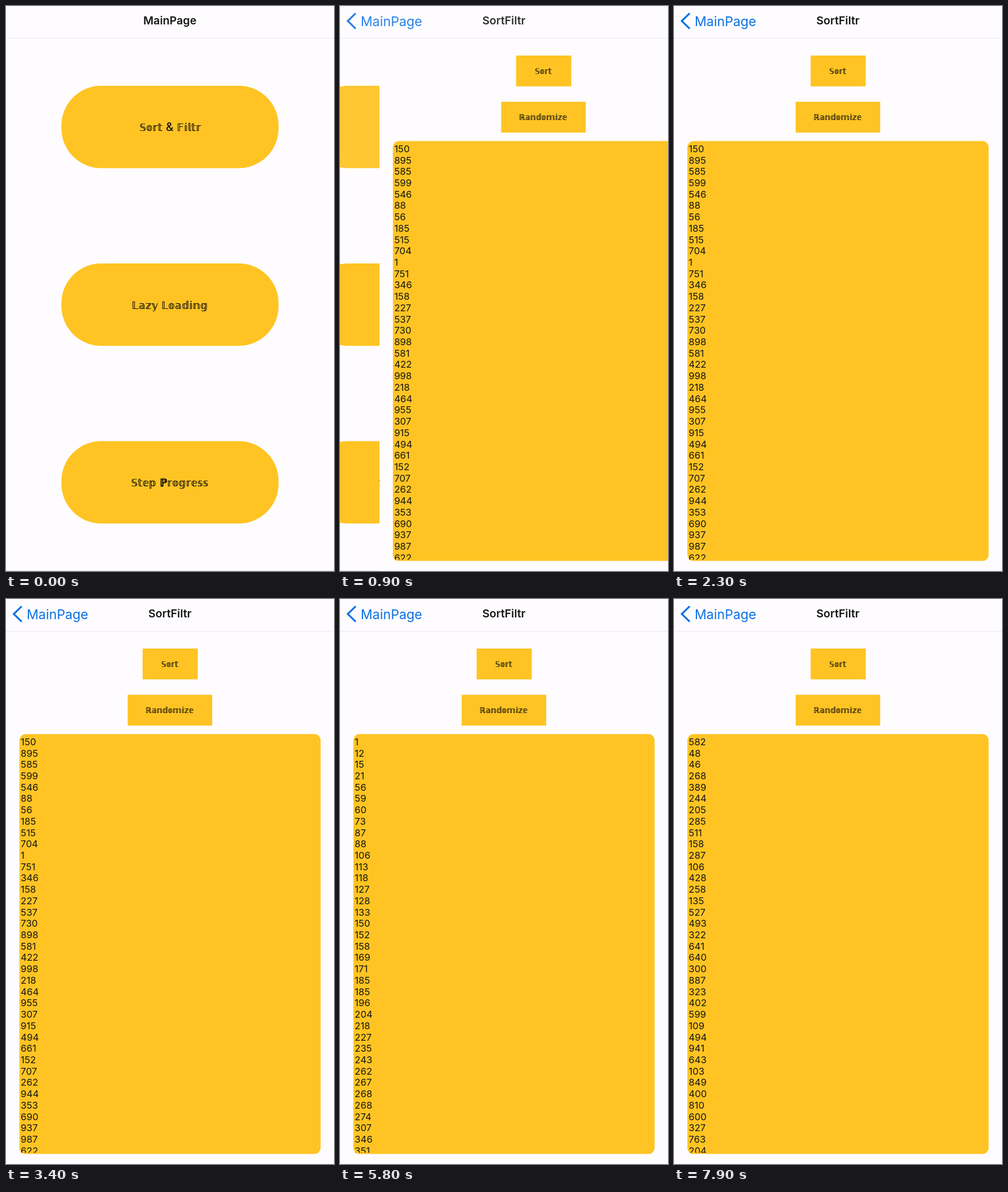
Animation of 571x981 px, one loop 8 s. Source, as an HTML page:

```html
<!DOCTYPE html>
<html lang="en">
<head>
<meta charset="utf-8">
<title>Sort and filter demo</title>
<style>
  html, body { margin: 0; width: 100%; height: 100%; overflow: hidden; background: #fefcff; }
  svg { display: block; width: 100%; height: 100%; }
  text { font-family: Inter, "Liberation Sans", sans-serif; fill: #151515; }
  .title { font-size: 19.3px; font-weight: 600; text-anchor: middle; }
  .back { font-size: 22.8px; fill: #0b72e3; }
  .rows { font-size: 16.5px; }
  .struck { font-family: "DejaVu Sans", sans-serif; text-anchor: middle; fill: #0c0c0c; stroke: #0c0c0c; stroke-width: .15px; }
  .big { font-size: 18.2px; }
  .small { font-size: 13.5px; }
  .plain { font-family: Inter, sans-serif; font-size: 20.5px; }
  .heavy { stroke-width: .9px; }
  .fill { fill: #ffc423; }
  .page { fill: #fefcff; }
  .line { fill: #e9e7eb; }
</style>
</head>
<body>
<svg viewBox="0 0 571 981" preserveAspectRatio="none">
  <defs>
    <clipPath id="rowClip"><rect x="24" y="235" width="523" height="726.5"/></clipPath>
  </defs>
  <rect class="page" width="571" height="981"/>

  <g id="home">
    <g id="sortFiltr">
      <rect class="fill" x="96.5" y="138.5" width="378" height="143" rx="69"/>
      <text class="struck big" x="286" y="217">𝕊𝕠𝕣𝕥 <tspan class="plain">&amp;</tspan> 𝔽𝕚𝕝𝕥𝕣</text>
    </g>
    <rect class="fill" x="96.5" y="447" width="378" height="143" rx="69"/>
    <text class="struck big" x="285" y="525.5">𝕃𝕒𝕫𝕪 𝕃𝕠𝕒𝕕𝕚𝕟𝕘</text>
    <rect class="fill" x="96.5" y="755.5" width="378" height="143" rx="69"/>
    <text class="struck big" x="285" y="834">𝕊𝕥𝕖𝕡 <tspan class="heavy">ℙ</tspan>𝕣𝕠𝕘𝕣𝕖𝕤𝕤</text>
    <rect class="line" y="980" width="571" height="1"/>
  </g>

  <g id="detail">
    <rect class="page" y="57" width="571" height="924"/>
    <g id="sort">
      <rect class="fill" x="237.8" y="86" width="96" height="53.5"/>
      <text class="struck small" x="285.2" y="117.8">𝕊𝕠𝕣𝕥</text>
    </g>
    <g id="randomize">
      <rect class="fill" x="211.8" y="166.3" width="147.2" height="53.5"/>
      <text class="struck small" x="284.6" y="197.8">ℝ𝕒𝕟𝕕𝕠𝕞𝕚𝕫𝕖</text>
    </g>
    <rect class="fill" x="23.3" y="234.6" width="524.4" height="729" rx="11"/>
    <g id="rows" class="rows" clip-path="url(#rowClip)"></g>
  </g>

  <rect class="page" width="571" height="56"/>
  <rect class="line" y="55.5" width="571" height="1"/>
  <text id="homeTitle" class="title" x="285.3" y="32">MainPage</text>
  <g id="detailBar">
    <path d="M27.3 12.7L13.5 26L27.3 39.3" fill="none" stroke="#0b72e3" stroke-width="3.2"/>
    <text class="back" x="36" y="34.6">MainPage</text>
    <text class="title" x="285.3" y="32">SortFiltr</text>
  </g>
</svg>
<script>
const LOOP = 8000, STEP = 100, WIDTH = 571;
const PUSH = 700, SORT = 4400, SHUFFLE = 7000;
const FADE = 280;
const el = id => document.getElementById(id);
const parse = s => s.split(' ').map(Number);

const initial = parse('150 895 585 599 546 88 56 185 515 704 1 751 346 158 227 537 730 898 581 422 998 218 464 955 307 915 494 661 152 707 262 944 353 690 937 987 622');
const below = parse('12 15 21 59 60 73 87 106 113 118 127 128 133 169 171 185 196 204 235 243 267 268 268 274 351');
const sorted = [...initial, ...below].sort((a, b) => a - b).slice(0, initial.length);
const shuffled = parse('582 48 46 268 389 244 205 285 511 158 287 106 428 258 135 527 493 322 641 640 300 887 323 402 599 109 494 941 643 103 849 400 810 600 327 763 204');

const cells = initial.map((_, i) => {
  const cell = document.createElementNS('http://www.w3.org/2000/svg', 'text');
  cell.setAttribute('x', 25.6);
  cell.setAttribute('y', 253.8 + i * 19.72);
  return el('rows').appendChild(cell);
});

let shown;
function showRows(values) {
  if (values === shown) return;
  shown = values;
  cells.forEach((cell, i) => { cell.textContent = values[i]; });
}

// Dims on touch, then eases back after release.
function pressAlpha(t, release) {
  const age = t - release;
  if (age < -100 || age > FADE) return 1;
  if (age <= 0) return 0.2;
  return 1 - 0.8 * (1 - age / FADE) ** 2;
}

// Critically damped spring: distance left to travel, from 1 to 0.
function remaining(age) {
  if (age <= 0) return 1;
  const w = age * 0.01827;
  const left = (1 + w) * Math.exp(-w);
  return left < 0.002 ? 0 : left;
}

const shift = (id, x) => el(id).setAttribute('transform', `translate(${x} 0)`);
const fade = (id, alpha) => el(id).setAttribute('opacity', alpha);

function draw(t) {
  const left = remaining(t - PUSH);
  shift('home', -0.3 * WIDTH * (1 - left));
  shift('detail', WIDTH * left);
  fade('homeTitle', Math.max(0, 1 - (1 - left) * 1.15));
  fade('detailBar', 1 - left);
  fade('sortFiltr', pressAlpha(t, PUSH));
  fade('sort', pressAlpha(t, SORT));
  fade('randomize', pressAlpha(t, SHUFFLE));
  showRows(t < SORT ? initial : t < SHUFFLE ? sorted : shuffled);
}

const start = performance.now();
function tick() {
  const t = (performance.now() - start) % LOOP;
  draw(Math.floor(t / STEP) * STEP);
  requestAnimationFrame(tick);
}
draw(0);
requestAnimationFrame(tick);
</script>
</body>
</html>
```
